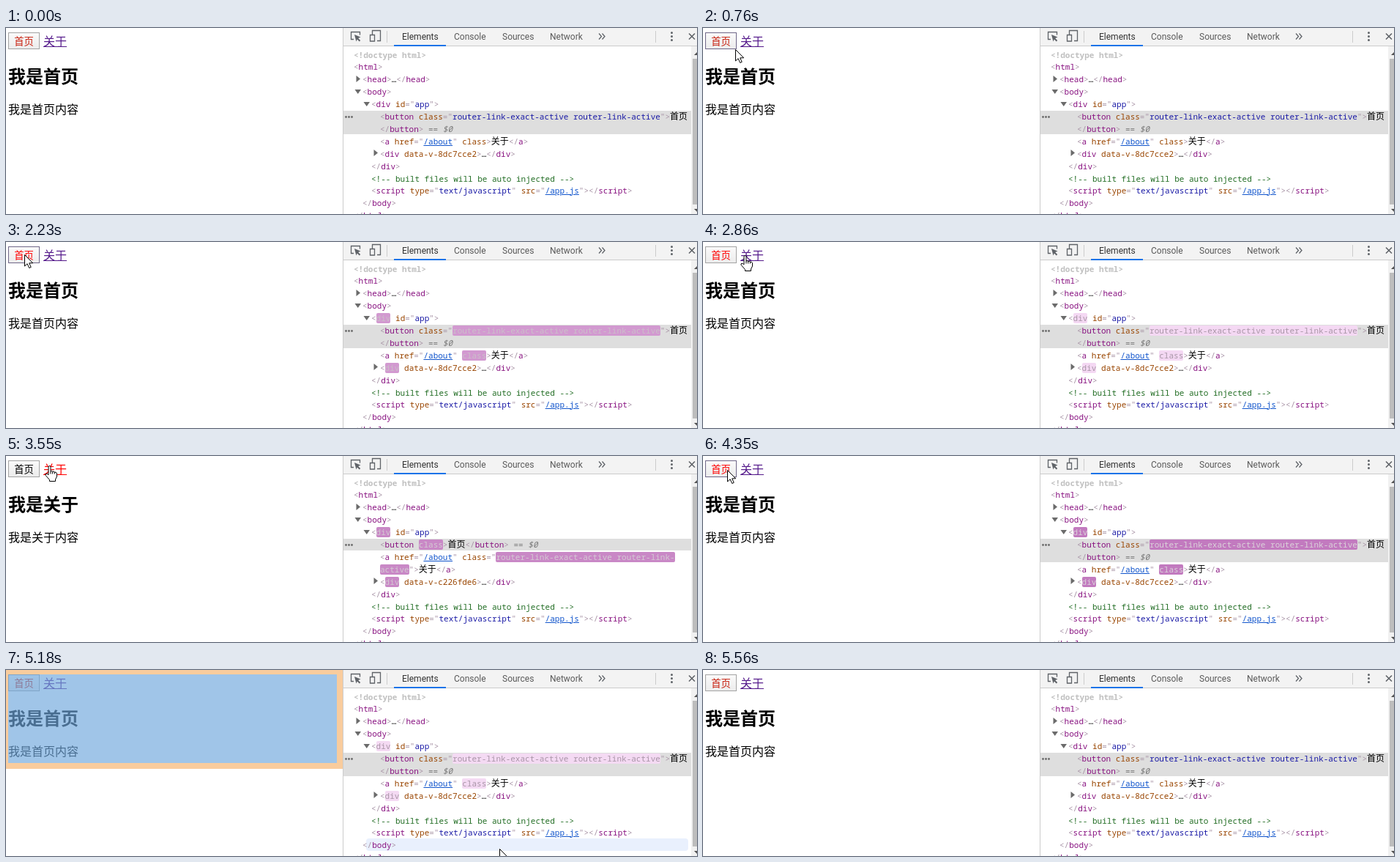
Write an HTML page that moves like this. It is 944 by 254 pixels and loops after 6030 ms.

```html
<!DOCTYPE html>
<html lang="zh-CN">
<head>
<meta charset="utf-8">
<title>Router link demo</title>
<style>
html, body { margin: 0; width: 100%; height: 100%; overflow: hidden; background: #fff; }
#stage { position: relative; width: 944px; height: 254px; overflow: hidden; color: #000;
  font-family: "Noto Sans CJK SC", "Noto Sans CJK", sans-serif; }
:where(#stage div, #stage svg) { position: absolute; left: 0; top: 0; white-space: pre; }

/* page */
#btn { left: 3px; top: 6px; width: 43px; height: 23px; box-sizing: border-box; border: 1px solid #a3a3a3;
  background: linear-gradient(#fafafa, #ececec); font-size: 13.333px; line-height: 21px; text-align: center; }
#btn.over { border-color: #6f6788; }
#link { left: 51px; top: 7px; font-size: 16px; line-height: 20px; text-decoration: underline; }
#head { left: 3px; top: 49px; font-size: 24px; line-height: 32px; font-weight: bold; }
#text { left: 3px; top: 100px; font-size: 16px; line-height: 20px; }

/* inspector overlays */
#boxModel { left: 3px; top: 6px; width: 27px; height: 17px; border: 2px solid rgba(255,229,153,.66);
  padding: 1px 6px; background: rgba(111,168,220,.66); background-clip: content-box;
  box-shadow: inset 0 0 0 1px rgba(147,196,125,.4); }
#tip { left: 3px; top: 37px; width: 300px; height: 44px; border-radius: 3px; background: #fff;
  box-shadow: 0 1px 5px rgba(0,0,0,.4); font: bold 12px/17px Roboto, sans-serif; color: #1a1aa6; }
#tip::before { content: ""; position: absolute; left: 8px; top: -8px; border: 8px solid transparent;
  border-top: 0; border-bottom-color: #fff; }
#tip div { left: 8px; top: 6px; }
#tip .size { left: 234px; font-weight: normal; color: #777; }
#bodyBox { width: 449px; height: 121px; border: solid rgba(246,178,107,.66);
  border-width: 6px 8px 8px 3px; background: rgba(111,168,220,.66); background-clip: padding-box; }

/* devtools */
#tools { left: 460px; width: 484px; height: 254px; background: #fff; box-shadow: inset 1px 0 #ccc; }
#bar { left: 1px; width: 483px; height: 24px; background: #f3f3f3; border-bottom: 1px solid #ccc; }
.tab { top: 3px; font: 12px/18px Roboto, sans-serif; color: #5a5a5a; }
#select { left: 1px; top: 113px; width: 475px; background: #dedede; }
#hover { left: 32px; width: 440px; height: 17px; border-radius: 4px; background: #e9f0fd; }
.row { height: 17px; font: 11px/17px "Noto Sans Mono", monospace; }
.t { color: #a894a6; }
.n { color: #881280; }
.a { color: #994500; }
.v { color: #1a1aa6; }
.u { color: #1155cc; text-decoration: underline; }
.k { color: #236e25; }
.d { color: #c0c0c0; font-weight: bold; }
.s { color: #777; }
.c { color: #000; font: 12px/0 "Noto Sans CJK SC", "Noto Sans CJK", sans-serif; }
.f { display: inline-block; line-height: 14px; border-radius: 2px;
  animation: flash 1.4s cubic-bezier(0,0,.2,1) both paused; animation-delay: calc(var(--age) * -1ms); }
@keyframes flash {
  from { background-color: rgb(158,54,153); color: #fff; }
  80% { background-color: rgb(245,219,244); color: inherit; }
}
</style>
</head>
<body>
<div id="stage">
  <div id="btn">首页</div>
  <div id="link">关于</div>
  <div id="head"></div>
  <div id="text"></div>
  <div id="boxModel"></div>
  <div id="bodyBox"></div>
  <div id="tip"><div><span class="n">button</span>.router-link-exact-active.rou
ter-link-active</div><div class="size">42.67 × 23</div></div>

  <div id="tools">
    <div id="select"></div>
    <div id="hover"></div>
    <div id="home"></div>
    <div id="about"></div>
    <svg width="484" height="254" viewBox="460 0 484 254">
      <g fill="#6b6b6b">
        <path d="M478.5 65v9l5.5-4.5zM502.5 166v9l5.5-4.5zM476.5 84h8.500l-4.250 6zM488.500 101h8.500l-4.250 6z"/>
        <circle cx="464.5" cy="121.5" r="1.4"/><circle cx="468.5" cy="121.5" r="1.4"/><circle cx="472.5" cy="121.5" r="1.4"/>
      </g>
      <path fill="#f1f1f1" d="M936 25h8v229h-8z"/>
      <path fill="#bdbdbd" d="M938 42h6v199h-6z"/>
      <path fill="#505050" d="M940 37l4-4v4zM940 247l4 4v-4z"/>
    </svg>
    <div id="bar"></div>
    <div class="tab" style="left:81px;color:#333">Elements</div>
    <div class="tab" style="left:152px">Console</div>
    <div class="tab" style="left:218px">Sources</div>
    <div class="tab" style="left:283px">Network</div>
    <svg width="484" height="25" viewBox="460 0 484 25" fill="none" stroke="#5f6368" stroke-width="1.3">
      <path d="M475 15.5h-3.5v-10h12v4"/>
      <path fill="#5f6368" stroke="none" d="M476 9l8.5 3.5-3.3 1.5 3 3-1.4 1.4-3-3-1.3 3z"/>
      <path d="M500.5 9v-5.5h11v14h-4.5M497.5 9.5h6v8.5h-6z"/>
      <path stroke="#ccc" stroke-width="1" d="M520.5 4v16M887.5 4v16"/>
      <path d="M810 7.5l3.5 4-3.5 4M814.5 7.5l3.5 4-3.5 4"/>
      <path stroke-width="1.6" d="M933 7.5l8 8M941 7.5l-8 8"/>
      <g fill="#5f6368" stroke="none">
        <circle cx="909.5" cy="6.5" r="1.5"/><circle cx="909.5" cy="11.5" r="1.5"/><circle cx="909.5" cy="16.5" r="1.5"/>
      </g>
      <path stroke="#1a73e8" stroke-width="2" d="M530 24h71"/>
    </svg>
  </div>

  <svg id="arrow" width="16" height="22" fill="#fff" stroke="#000">
    <path d="M.5.5V16l3.600-3.300L6.700 18.500l2.500-1.100L6.700 11.800h5z"/>
  </svg>
  <svg id="hand" width="20" height="24" fill="#fff" stroke="#000" stroke-linejoin="round">
    <path d="M5 2Q5 .5 6.500.5T8 2v6Q9.500 7 10.700 8.300 12.300 7.600 13.400 9 16 8.700 16.500 11v4l-2 4v2.500h-8v-2L1.200 13.500Q.3 11.500 2 11.200 3.300 11 5 12.800z"/>
    <path fill="none" d="M8 8v3.500M10.700 8.300v3.200M13.400 9v2.500"/>
  </svg>
</div>

<script>
const $ = id => document.getElementById(id);
const span = (cls, s) => `<span class="${cls}">${s}</span>`;
const open = (name, attrs = '', cls = 'n') => span('t', '&lt;' + span(cls, name) + attrs + '&gt;');
const close = name => span('t', '&lt;/' + span('n', name) + '&gt;');
const attr = (name, value, cls = 'v') => ` ${span('a', name)}="${span(cls, value)}"`;
const zh = s => span('c', s);
const rowTop = i => Math.round(27.5 + 16.9 * i);

const marker = span('s', ' == <i>$0</i>');
const href = attr('href', '/about', 'v u');
const flashedClass = ' ' + span('a f', 'class');

const homeRows = [
  open('button', attr('class', 'router-link-exact-active router-link-active', 'v f')) + zh('首页'),
  close('button') + marker,
  open('a', href + flashedClass) + zh('关于') + close('a')
];
const aboutRows = [
  open('button', flashedClass) + zh('首页') + close('button') + marker,
  span('t', '&lt;' + span('n', 'a') + href + ' ' + span('a', 'class') + '="' + span('v f', 'router-link-exact-active router-link-')),
  span('t', span('v f', 'active') + '"&gt;') + zh('关于') + close('a')
];

function buildTree(id, middle, hash) {
  const rows = [
    [15, span('d', '&lt;!doctype html&gt;')],
    [15, open('html')],
    [27, open('head') + '…' + close('head')],
    [27, open('body')],
    [39, open('div', attr('id', 'app'), 'n f')],
    ...middle.map(s => [51, s]),
    [51, open('div', ' ' + span('a', 'data-v-' + hash), 'n f') + '…' + close('div')],
    [39, close('div')],
    [39, span('k', '&lt;!-- built files will be auto injected --&gt;')],
    [39, open('script', attr('type', 'text/javascript') + attr('src', '/app.js', 'v u')) + close('script')],
    [27, close('body')],
    [15, close('html')]
  ];
  $(id).innerHTML = rows.map(([x, s], i) =>
    `<div class="row" style="left:${x}px;top:${rowTop(i)}px">${s}</div>`).join('');
}
buildTree('home', homeRows, '8dc7cce2');
buildTree('about', aboutRows, 'c226fde6');

const LOOP = 6030, TICK = 77;
// pointer path: time, x, y
const path = [
  [140, 640, 236], [217, 480, 190], [294, 300, 140], [371, 196, 110],
  [600, 196, 110], [679, 110, 62], [756, 44, 29], [833, 48, 24], [987, 60, 9],
  [1290, 60, 9], [1526, 25, 17], [2520, 25, 17], [2835, 57, 18], [2990, 59, 13],
  [3640, 59, 13], [3790, 47, 14], [4020, 33, 19], [4440, 33, 19],
  [4606, 300, 60], [4837, 655, 130], [4914, 662, 163], [4991, 667, 195], [5145, 674, 244], [5222, 675, 275]
];

function pointer(t) {
  const i = path.findIndex(p => p[0] > t);
  if (i < 1) return path[i ? path.length - 1 : 0].slice(1);
  const a = path[i - 1], b = path[i], k = (t - a[0]) / (b[0] - a[0]);
  return [1, 2].map(j => Math.round(a[j] + (b[j] - a[j]) * k));
}

const within = (t, a, b) => t >= a && t < b;
const show = (id, on) => { $(id).style.display = on ? 'block' : 'none'; };

function draw(t) {
  const aboutPage = within(t, 1150, 1760) || within(t, 3180, 4030);
  const aboutTree = within(t, 1300, 1930) || within(t, 3330, 4180);
  const name = aboutPage ? '关于' : '首页';
  const red = within(t, 1150, 5100) ? '#f00' : '#c8200f';
  $('head').textContent = '我是' + name;
  $('text').textContent = '我是' + name + '内容';
  $('btn').style.color = aboutPage ? '#000' : red;
  $('link').style.color = aboutPage ? '#f00' : '#551a8b';

  show('home', !aboutTree);
  show('about', aboutTree);
  $('select').style.height = aboutTree ? '16px' : '32px';
  const updated = [4180, 3330, 1930, 1300].find(s => t >= s) ?? -LOOP;
  $('tools').style.setProperty('--age', t - updated);

  const [x, y] = pointer(140 + Math.floor((t - 140) / TICK) * TICK);
  const visible = within(t, 150, 5220);
  const onLink = within(x, 51, 84) && within(y, 8, 29);
  show('arrow', visible && !onLink);
  show('hand', visible && onLink);
  $('arrow').style.transform = `translate(${x}px,${y}px)`;
  $('hand').style.transform = `translate(${x - 6}px,${y}px)`;
  $('btn').className = visible && within(x, 3, 47) && within(y, 6, 30) ? 'over' : '';

  const row = Math.floor((y - 27.5) / 16.9);
  show('hover', visible && within(x, 461, 936) && row >= 0 && row !== 5 && row !== 6);
  $('hover').style.top = rowTop(row) + 'px';

  const onButton = within(t, 4860, 5020);
  show('boxModel', onButton);
  show('tip', onButton);
  show('bodyBox', within(t, 220, 300) || within(t, 5100, 5300));
}

let start;
function frame(now) {
  start ??= now;
  draw((now - start) % LOOP);
  requestAnimationFrame(frame);
}
draw(0);
requestAnimationFrame(frame);
</script>
</body>
</html>
```
